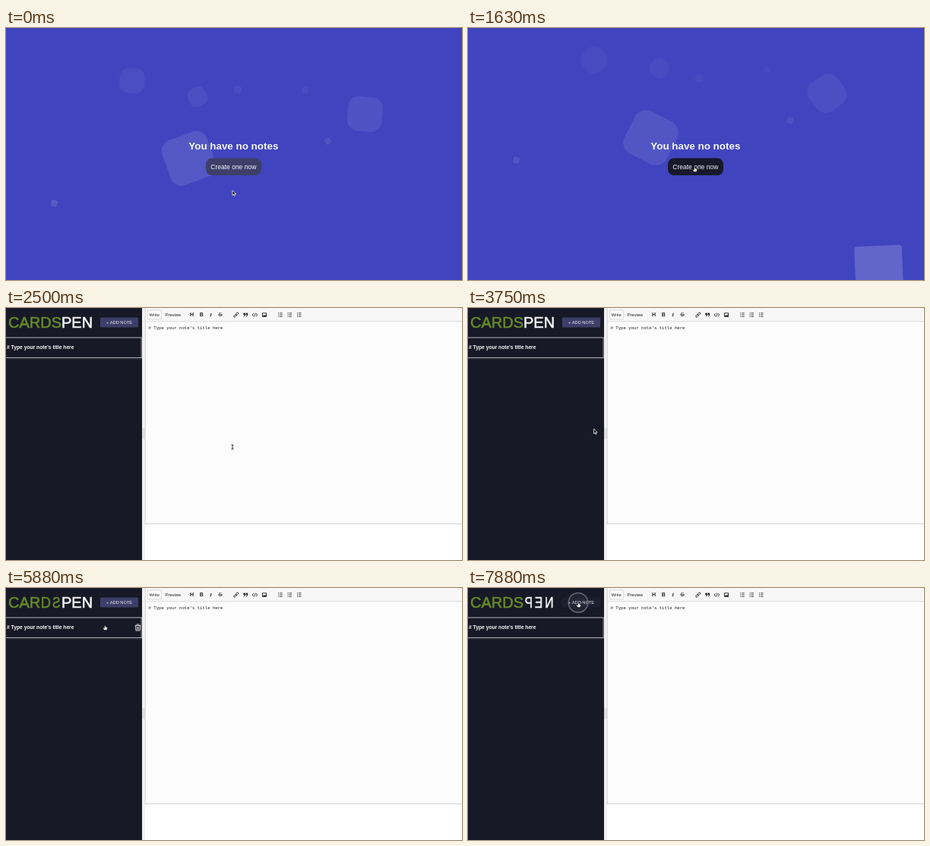
Animation, 600 px wide and 332 px high, one loop 8000 ms. Source, as an HTML page with a canvas:

```html
<!DOCTYPE html>
<html lang="en">
<head>
<meta charset="utf-8">
<title>Notes</title>
<style>
html, body { margin: 0; width: 100%; height: 100%; overflow: hidden; background: #4044be; }
canvas { display: block; width: 600px; height: 332px; }
</style>
</head>
<body>
<canvas id="stage" width="600" height="332"></canvas>
<script>
const ctx = document.getElementById('stage').getContext('2d');
const LOOP = 8000, OPEN = 2490;
const SANS = '"Liberation Sans", Arial, sans-serif';
const MONO = '"Liberation Mono", "Courier New", monospace';
const SCALE = 0.418, RISE = 1000 * SCALE, FLOOR = 400.5;

// floating squares: left share, side, age at start (s), lifetime (s)
const SQUARES = [
  [.25, 80, 18.8, 25], [.10, 20, 4.75, 12], [.70, 20, 14.8, 25],
  [.40, 60, 12.8, 18], [.65, 20, 18.8, 25], [.75, 110, 15.8, 25],
  [.35, 150, 11.8, 25], [.50, 25, 33.8, 45], [.85, 150, -.29, 11]
];

// pointer stops: time, x, y
const PATH = [
  [0, 298, 214], [400, 298, 214], [1000, 298, 183], [3200, 298, 183],
  [4000, 126, 152], [4250, 127, 150], [4800, 139, 34], [5150, 139, 34],
  [5550, 130, 49], [5950, 130, 49], [6450, 156, 49], [6750, 156, 49],
  [7250, 145, 19], [LOOP, 145, 19]
];

const smooth = u => u * u * (3 - 2 * u);

function bezier(u, a, b) {
  return 3 * u * (1 - u) * (1 - u) * a + 3 * u * u * (1 - u) * b + u * u * u;
}

// CSS "ease"
function ease(x) {
  let lo = 0, hi = 1;
  for (let i = 0; i < 20; i++) {
    const mid = (lo + hi) / 2;
    if (bezier(mid, .25, .25) < x) lo = mid; else hi = mid;
  }
  return bezier(lo, .1, 1);
}

function pointer(t) {
  const i = Math.max(1, PATH.findIndex(p => p[0] > t));
  const [t0, x0, y0] = PATH[i - 1], [t1, x1, y1] = PATH[i];
  const u = smooth((t - t0) / (t1 - t0));
  return { x: x0 + (x1 - x0) * u, y: y0 + (y1 - y0) * u };
}

function rect(x, y, w, h, color) {
  ctx.fillStyle = color;
  ctx.fillRect(x, y, w, h);
}

function round(x, y, w, h, r, color) {
  ctx.beginPath();
  ctx.roundRect(x, y, w, h, r);
  ctx.fillStyle = color;
  ctx.fill();
}

function line(points, color, width = 1) {
  ctx.beginPath();
  points.forEach(([x, y], i) => i ? ctx.lineTo(x, y) : ctx.moveTo(x, y));
  ctx.strokeStyle = color;
  ctx.lineWidth = width;
  ctx.stroke();
}

function text(str, x, y, font, color, align = 'left') {
  ctx.font = font;
  ctx.fillStyle = color;
  ctx.textAlign = align;
  ctx.fillText(str, x, y);
}

function drawSquares(t) {
  for (const [left, side, age, life] of SQUARES) {
    const p = (age + t / 1000) / life;
    if (p < 0) continue;
    const s = side * SCALE;
    ctx.save();
    ctx.translate(600 * left + s / 2 - .7, FLOOR - s / 2 - RISE * p);
    ctx.rotate(p * 4 * Math.PI);
    round(-s / 2, -s / 2, s, s, s * p / 2, `rgba(255,255,255,${.2 * (1 - p)})`);
    ctx.restore();
  }
}

function drawEmpty(t, at) {
  rect(0, 0, 600, 332, '#4044be');
  drawSquares(t);
  text('You have no notes', 299.3, 159.5, `bold 13.4px ${SANS}`, '#f8f8fc', 'center');
  round(263, 171.5, 73, 22.5, 8, at.y < 194 ? '#171829' : '#3d3f69');
  text('Create one now', 299.3, 185.7, `8.5px ${SANS}`, '#f4f4f8', 'center');
}

// each letter spins once every 3 s; the white ones go together, before the rest
function drawLogo(t) {
  const period = 3000, spin = 600, start = 4670;
  let x = 3;
  [...'CARDSPEN'].forEach((ch, i) => {
    const green = i < 5;
    const dt = t - start - (green ? 200 * (i + 1) : 0);
    const p = dt < 0 ? 1 : Math.min(1, dt % period / spin);
    const color = green ? '#658a28' : '#f5f5f7';
    ctx.font = `20px ${SANS}`;
    const w = ctx.measureText(ch).width;
    ctx.save();
    ctx.translate(x + w / 2, 25.8);
    ctx.scale(Math.cos(2 * Math.PI * (1 - ease(p))), 1);
    text(ch, 0, 0, ctx.font, color, 'center');
    ctx.strokeStyle = color;
    ctx.lineWidth = .6;
    ctx.strokeText(ch, 0, 0);
    ctx.restore();
    x += w;
  });
}

function drawTrash() {
  const c = '#e8e8ee';
  line([[169.8, 49.4], [177.2, 49.4]], c);
  line([[172, 48.6], [172, 47.8], [175, 47.8], [175, 48.6]], c, .8);
  line([[170.7, 50], [170.9, 56], [176.1, 56], [176.3, 50]], c);
  for (const x of [172.4, 173.5, 174.6]) line([[x, 51], [x, 54.8]], c, .6);
}

function drawSidebar(t, at) {
  rect(0, 0, 179, 332, '#181926');
  drawLogo(t);
  const overAdd = at.x > 124 && at.x < 174 && at.y < 25.5;
  round(124, 12.5, 50, 13, 1, overAdd ? '#1d1e2f' : '#3d3f69');
  text('+ ADD NOTE', 149, 21, `5.7px ${SANS}`, '#f0f0f6', 'center');

  rect(0, 38.5, 179, 1, '#b4b4bc');
  rect(0, 65, 179, 1, '#b4b4bc');
  rect(177.6, 39, .9, 26, '#a0a0aa');
  rect(0, 67, 179, .7, '#343542');
  text("# Type your note's title here", 1, 54.3, `bold 6.72px ${SANS}`, '#fafafa');
  if (at.x < 178 && at.y > 39 && at.y < 66) drawTrash();
}

function drawIcons() {
  const c = '#222';
  text('H', 244.6, 11.3, `bold 7px ${SANS}`, c, 'center');
  text('B', 257.2, 11.3, `bold 7px ${SANS}`, c, 'center');
  text('I', 269.5, 11.3, `italic bold 7px "Liberation Serif", serif`, c, 'center');
  text('S', 282, 11.3, `6.6px ${SANS}`, c, 'center');
  line([[279, 9], [285, 9]], c, .8);

  for (const dx of [-1.4, 1.4]) {
    ctx.save();
    ctx.translate(302.8 + dx, 9 - dx);
    ctx.rotate(-Math.PI / 4);
    ctx.beginPath();
    ctx.roundRect(-1.9, -1.1, 3.8, 2.2, 1.1);
    ctx.strokeStyle = c;
    ctx.lineWidth = .9;
    ctx.stroke();
    ctx.restore();
  }
  for (const x of [312.3, 315.5]) {
    round(x, 6.6, 2.5, 2.7, .4, c);
    line([[x + 2, 8.5], [x + 2, 10], [x + .5, 11.2]], c);
  }
  line([[325.7, 7], [324.3, 9], [325.7, 11]], c, .9);
  line([[329.1, 7], [330.5, 9], [329.1, 11]], c, .9);
  line([[328, 6.5], [326.8, 11.5]], c, .8);

  ctx.strokeStyle = c;
  ctx.lineWidth = .9;
  ctx.strokeRect(337.4, 6.8, 5.2, 4.5);
  ctx.beginPath();
  ctx.moveTo(337.8, 11);
  ctx.lineTo(339.3, 9.1);
  ctx.lineTo(340.2, 9.9);
  ctx.lineTo(341.2, 8.6);
  ctx.lineTo(342.3, 11);
  ctx.fillStyle = c;
  ctx.fill();

  for (const x of [358.2, 370.5, 383]) {
    for (const y of [6.8, 9, 11.2]) {
      rect(x, y - .5, 1, 1, c);
      rect(x + 1.9, y - .4, 3.6, .8, c);
    }
  }
}

function drawEditor() {
  rect(179, 0, 4, 332, '#f1f1f1');
  rect(179, 158, 4, 15, '#dfdfdf');
  rect(183, 0, 417, 332, '#ffffff');
  rect(183, 0, 417, 18, '#f7f7f7');
  rect(183, 18, 417, 266, '#fcfcfc');
  rect(183, 17.4, 417, .8, '#d4d4d4');
  rect(183, 283.8, 417, .9, '#c8c8c8');
  rect(182.8, 0, .8, 284.5, '#cfcfcf');

  round(186, 2.6, 18.5, 12.6, 1, '#c9c9c9');
  round(186.6, 3.2, 17.3, 11.4, .7, '#fdfdfd');
  text('Write', 195.2, 11, `5.8px ${SANS}`, '#222', 'center');
  text('Preview', 220, 11, `5.75px ${SANS}`, '#222', 'center');
  drawIcons();
  text("# Type your note's title here", 187.5, 27.8, `5.63px ${MONO}`, '#1c1c1c');
}

function drawArrow() {
  ctx.beginPath();
  ctx.moveTo(0, 0);
  for (const [x, y] of [[0, 6.4], [1.5, 5.1], [2.5, 7.3], [3.5, 6.8], [2.5, 4.7], [4.5, 4.6]]) ctx.lineTo(x, y);
  ctx.closePath();
  ctx.fillStyle = '#000';
  ctx.strokeStyle = '#fff';
  ctx.lineWidth = .8;
  ctx.fill();
  ctx.stroke();
}

function drawHand() {
  ctx.beginPath();
  ctx.moveTo(-.5, 0);
  for (const [x, y] of [[.6, 0], [.9, 2], [3.4, 2.7], [3.2, 5], [2.5, 6.5], [-.6, 6.5], [-2.6, 3.6], [-1.8, 3.1], [-.6, 4]]) ctx.lineTo(x, y);
  ctx.closePath();
  ctx.fillStyle = '#fff';
  ctx.strokeStyle = '#111';
  ctx.lineWidth = .6;
  ctx.fill();
  ctx.stroke();
}

function drawBeam(color) {
  line([[-1.6, -2.8], [0, -2.2], [1.6, -2.8]], color, .8);
  line([[0, -2.4], [0, 2.8]], color, .9);
  line([[-1.6, 3.2], [0, 2.6], [1.6, 3.2]], color, .8);
}

function drawPointer(t, at) {
  const app = t >= OPEN;
  const link = app
    ? at.x < 178 && (at.y < 25.5 || (at.y > 39 && at.y < 66))
    : at.y < 194;
  ctx.save();
  ctx.translate(at.x, at.y);
  if (t > 2300 && at.x > 183) drawBeam(app ? '#111' : '#e8e8ee');
  else if (link) drawHand();
  else drawArrow();
  ctx.restore();
}

function drawClick(t) {
  if (t < 7740) return;
  ctx.beginPath();
  ctx.arc(145, 19.3, 12.8, 0, 2 * Math.PI);
  ctx.fillStyle = 'rgba(150,150,165,.08)';
  ctx.fill();
  ctx.strokeStyle = 'rgba(150,150,162,.6)';
  ctx.lineWidth = 1.5;
  ctx.stroke();
}

function frame() {
  const t = performance.now() % LOOP;
  const at = pointer(t);
  if (t < OPEN) {
    drawEmpty(t, at);
  } else {
    drawEditor();
    drawSidebar(t, at);
    drawClick(t);
  }
  drawPointer(t, at);
  requestAnimationFrame(frame);
}
frame();
</script>
</body>
</html>
```
